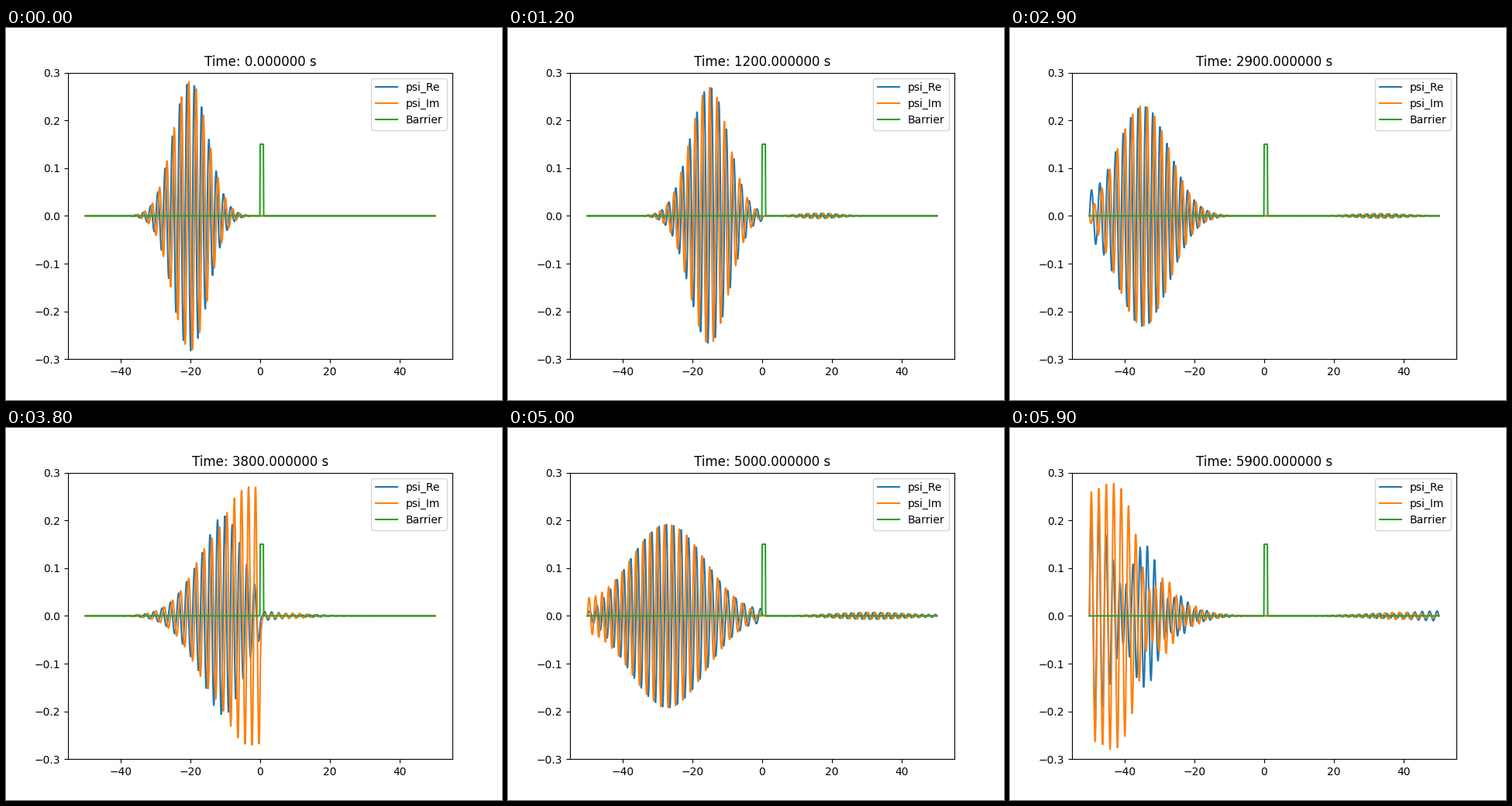
A matplotlib script that plays this animation: 640x480 px, repeating every 6000 ms.

```python
import numpy as np
import matplotlib.pyplot as plt
from matplotlib.animation import FuncAnimation

# Wave packet hitting a thin barrier, hard walls at both ends (hbar = m = 1)
FRAMES = 60
INTERVAL = 100
STEPS_PER_FRAME = 100
DT = 0.01

HALF_WIDTH = 50
N = 1001
DX = 2 * HALF_WIDTH / (N - 1)
X0, SIGMA, K0 = -20, 5, 3
V0, V_SCALE = 15, 0.01

x = (np.arange(N) - N // 2) * DX
barrier = np.where((x > -DX / 2) & (x < 1 - DX / 2), V0, 0.0)

norm = 1 / np.sqrt(SIGMA * np.sqrt(2 * np.pi))
start = norm * np.exp(-(x - X0) ** 2 / (2 * SIGMA ** 2) + 1j * K0 * x)

# Finite-difference Hamiltonian on the inner points
hop = np.full(N - 3, -0.5 / DX ** 2)
hamiltonian = (np.diag(1 / DX ** 2 + barrier[1:-1])
               + np.diag(hop, 1) + np.diag(hop, -1))
energy, modes = np.linalg.eigh(hamiltonian)
weights = modes.T @ start[1:-1]


def psi(t):
    """Wave function at time t, zero at the walls."""
    wave = np.zeros(N, dtype=complex)
    wave[1:-1] = modes @ (weights * np.exp(-1j * energy * t))
    return wave


fig, ax = plt.subplots(figsize=(6.4, 4.8), dpi=100)
line_re, = ax.plot(x, start.real, label="psi_Re")
line_im, = ax.plot(x, start.imag, label="psi_Im")
ax.plot(x, barrier * V_SCALE, label="Barrier")
ax.set_xlim(-55, 55)
ax.set_ylim(-0.3, 0.3)
ax.legend(loc="upper right")
title = ax.set_title("")


def update(frame):
    step = frame * STEPS_PER_FRAME
    wave = psi(step * DT)
    line_re.set_ydata(wave.real)
    line_im.set_ydata(wave.imag)
    title.set_text(f"Time: {step:.6f} s")
    return line_re, line_im, title


anim = FuncAnimation(fig, update, frames=FRAMES, interval=INTERVAL,
                     repeat=True, repeat_delay=0, blit=False)
plt.show()
```
